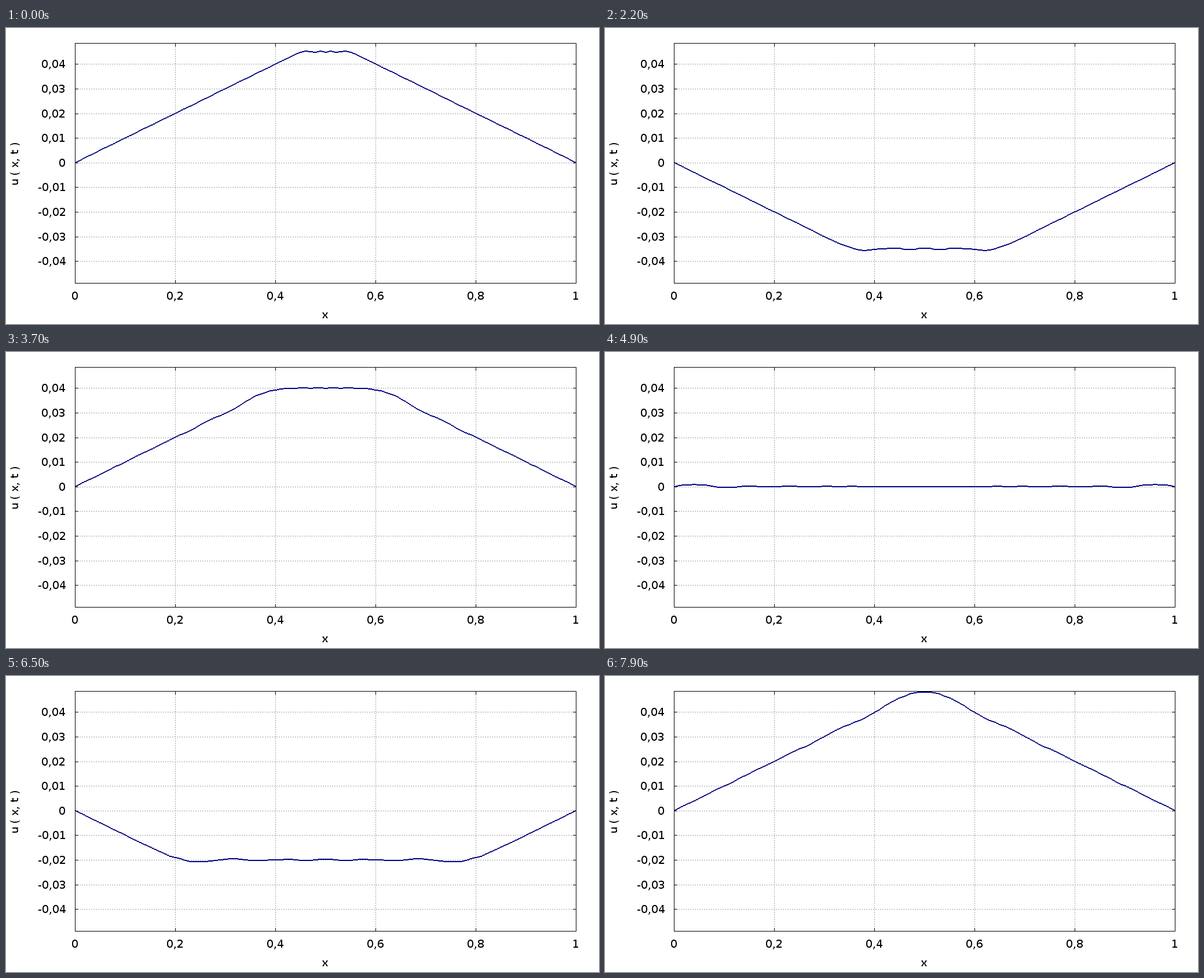
A matplotlib script for the animation above (8000 ms loop, 1024 px wide and 512 px high).

```python
import numpy as np
import matplotlib.pyplot as plt
from matplotlib.animation import FuncAnimation

W, H, DPI = 1024, 512, 100
PX = 72 / DPI                       # one pixel in points
LEFT, RIGHT, TOP, BOTTOM = 119, 984, 26, 441
ZERO_Y, SCALE_Y = 232.8, 4262       # pixel row of u = 0, pixels per unit
TICK = 6
FRAMES, INTERVAL = 80, 100

CELLS = 100
COURANT = 0.1
STEPS = 50                          # time steps per frame


def plucked_string():
    """Explicit leapfrog solution of the wave equation, one row per frame."""
    x = np.linspace(0, 1, CELLS + 1)
    old = 0.1 * np.minimum(x, 1 - x)

    def bend(u):
        d = np.zeros_like(u)
        d[1:-1] = COURANT ** 2 * (u[2:] - 2 * u[1:-1] + u[:-2])
        return d

    now = old + bend(old) / 2
    rows = []
    for step in range(1, FRAMES * STEPS + 1):
        if step % STEPS == 0:
            rows.append(now)
        old, now = now, 2 * now - old + bend(now)
    return x, np.array(rows)


def to_row(u):
    return np.round(ZERO_Y - SCALE_Y * u)


plt.rcParams["font.family"] = "DejaVu Sans"
plt.rcParams["text.hinting"] = "native"
plt.rcParams["text.hinting_factor"] = 1
fig = plt.figure(figsize=(W / DPI, H / DPI), dpi=DPI, facecolor="white")
ax = fig.add_axes([0, 0, 1, 1])
ax.set_xlim(0, W)
ax.set_ylim(H, 0)
ax.axis("off")


def thin(xs, ys, color="black", zorder=2, **kw):
    ax.plot(xs, ys, color=color, lw=PX, snap=False, zorder=zorder,
            solid_capstyle="butt", **kw)


def grid(xs, ys):
    thin(xs, ys, "#a0a0a0", zorder=1, dashes=(2, 2), dash_capstyle="butt")


def label(x, y, s, **kw):
    ax.text(x, y, s, fontsize=18.67 * PX, va="baseline", **kw)


def comma(v):
    return f"{v:g}".replace(".", ",")


for k in range(-4, 5):
    row = to_row(k / 100)
    ys = [row + 0.5] * 2
    grid([LEFT, RIGHT], ys)
    thin([LEFT, LEFT + TICK], ys)
    thin([RIGHT + 1 - TICK, RIGHT + 1], ys)
    label(103.5, row + 7, comma(k / 100), ha="right")

for k in range(6):
    col = LEFT + 173 * k
    xs = [col + 0.5] * 2
    if 0 < k < 5:
        grid(xs, [BOTTOM + 1, TOP])
    thin(xs, [TOP, TOP + TICK])
    thin(xs, [BOTTOM + 1 - TICK, BOTTOM + 1])
    label(col, 470, comma(k / 5), ha="center")

for y in (TOP, BOTTOM):
    thin([LEFT, RIGHT + 1], [y + 0.5] * 2, zorder=4)
for x in (LEFT, RIGHT):
    thin([x + 0.5] * 2, [TOP, BOTTOM + 1], zorder=4)

label(551, 502, "x", ha="center")
label(22, 234.5, "u ( x, t )", rotation=90, rotation_mode="anchor",
      ha="center")

pos, shapes = plucked_string()
nodes = np.round(LEFT + (RIGHT - LEFT) * pos)
cols = np.arange(LEFT, RIGHT + 1)
edges = np.arange(LEFT, RIGHT + 2)


def band(i):
    """Upper and lower edge of the two-pixel line in every column."""
    rows = np.clip(to_row(shapes[i]), TOP, BOTTOM)
    y = np.round(np.interp(cols, nodes, rows))
    return y - 1, y + 1


upper, lower = band(0)
curve = ax.stairs(upper, edges, baseline=lower, fill=True, color="#000080",
                  lw=0, zorder=3)
ax.set_xlim(0, W)
ax.set_ylim(H, 0)


def draw(i):
    upper, lower = band(i)
    curve.set_data(upper, edges, lower)
    return curve,


anim = FuncAnimation(fig, draw, frames=FRAMES, interval=INTERVAL,
                     init_func=lambda: draw(0), repeat=True, repeat_delay=0)
plt.show()
```
